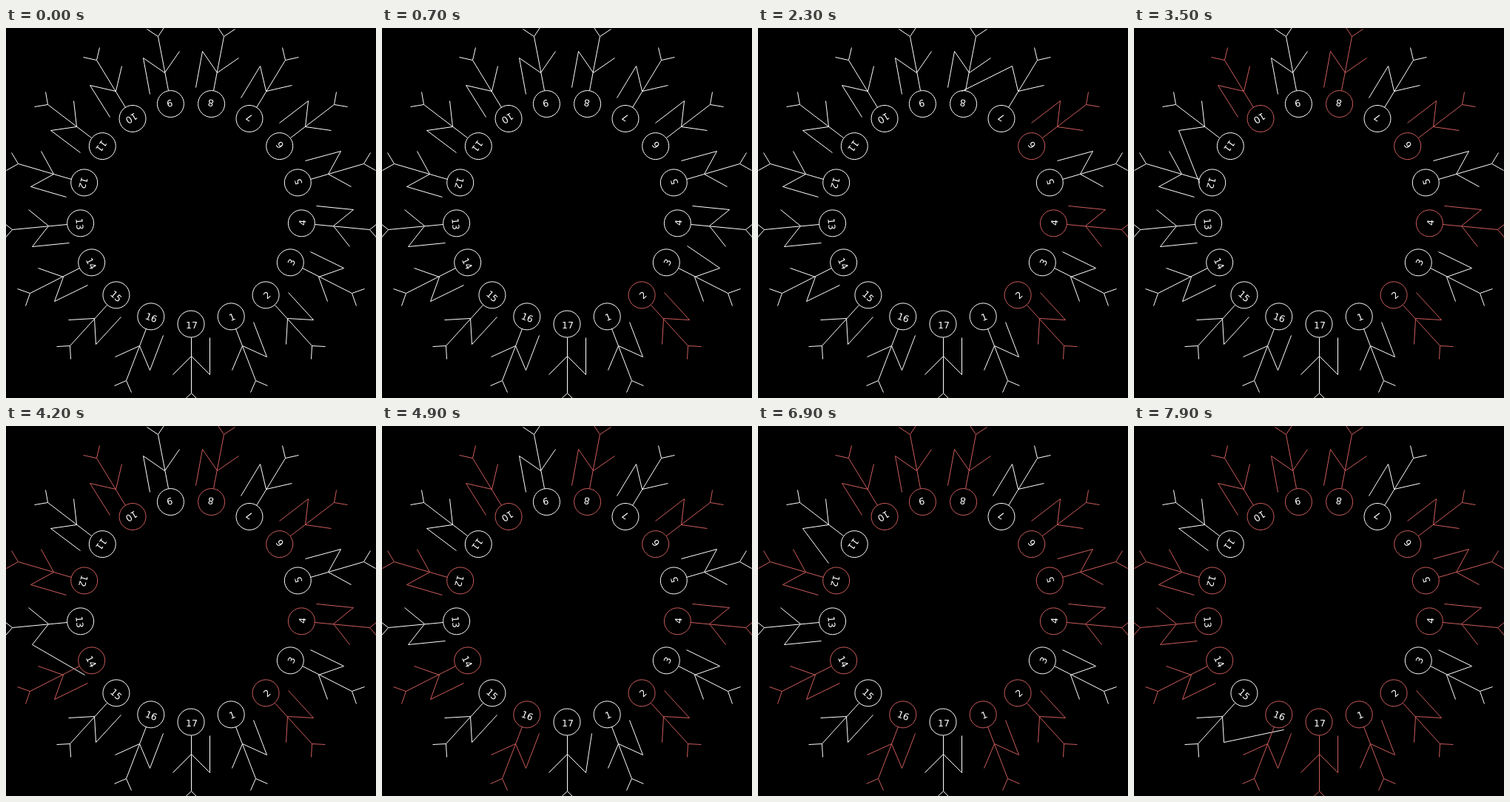
Animation, 500 px wide and 500 px high, one loop 8 s. Source, as an HTML page:

```html
<!DOCTYPE html>
<html lang="en">
<head>
<meta charset="utf-8">
<title>Josephus circle</title>
<style>
  html, body { margin: 0; width: 100%; height: 100%; overflow: hidden; background: #000; }
  svg { display: block; width: 100vw; height: 100vh; }
  path, circle { fill: none; stroke: #fff; stroke-width: 1; }
  .dead path, .dead circle { stroke: #cd5c5c; }
  text { fill: #fff; font: 12.5px "DejaVu Sans", Verdana, sans-serif; text-anchor: middle; }
</style>
</head>
<body>
<svg id="stage" viewBox="0 0 500 500"></svg>
<script>
const COUNT = 17, CENTER = 250, TICK = 100, TICKS = 80, SWING = 6;
const HIP = [0, 243], SHOULDER = [0, 193], HAND = [25, 218];
const REST = [25, 168], STEP = [8.05, -2.9];
const BODY = [
  [[0, 168], HIP], [HIP, [-12.5, 255.5]], [HIP, [12.5, 255.5]],
  [SHOULDER, [-25, 218]], [SHOULDER, HAND]
];
const stage = document.getElementById("stage");

function add(parent, tag, attrs) {
  const el = document.createElementNS("http://www.w3.org/2000/svg", tag);
  for (const key in attrs) el.setAttribute(key, attrs[key]);
  return parent.appendChild(el);
}

// Turns a point of the figure at the bottom of the ring into place.
function turn([x, y], angle) {
  const c = Math.cos(angle), s = Math.sin(angle);
  return [CENTER + x * c + y * s, CENTER - x * s + y * c];
}

// Line ends sit on whole pixels.
const snap = v => Math.floor(v + 1e-9) + 0.5;
const line = (from, to, angle) =>
  "M" + turn(from, angle).map(snap) + "L" + turn(to, angle).map(snap);

const people = Array.from({ length: COUNT }, (_, i) => {
  const angle = (i + 1) * 2 * Math.PI / COUNT;
  const group = add(stage, "g", {});
  const [cx, cy] = turn([0, 150], angle);
  add(group, "circle", { cx, cy, r: 18 });
  add(group, "path", { d: BODY.map(([a, b]) => line(a, b, angle)).join("") });
  const sword = add(group, "path", {});
  const spin = `translate(${cx} ${cy}) rotate(${-angle * 180 / Math.PI})`;
  add(group, "text", { x: 1, y: 5.7, transform: spin }).textContent = i + 1;
  return { group, sword, angle };
});

// Every second living person falls; the turn that crosses the end takes one tick more.
function planTurns() {
  const turns = [], alive = Array(COUNT).fill(true);
  const next = i => {
    do i = (i + 1) % COUNT; while (!alive[i]);
    return i;
  };
  for (let killer = 0, start = 0; start < TICKS;) {
    const victim = next(killer);
    const end = start + SWING + (victim < killer ? 1 : 0);
    turns.push({ killer, victim, start, end });
    alive[victim] = false;
    killer = next(victim);
    start = end;
  }
  return turns;
}
const turns = planTurns();

function draw(tick) {
  const swing = Array(COUNT).fill(0), dead = Array(COUNT).fill(false);
  for (const { killer, victim, start, end } of turns) {
    if (tick > start && tick <= end) swing[killer] = tick - start;
    if (tick >= end) dead[victim] = true;
  }
  people.forEach(({ group, sword, angle }, i) => {
    const tip = REST.map((v, axis) => v + STEP[axis] * swing[i]);
    sword.setAttribute("d", line(HAND, tip, angle));
    group.setAttribute("class", dead[i] ? "dead" : "");
  });
}

const begin = performance.now();
let shown = -1;
function loop() {
  const tick = Math.floor((performance.now() - begin) / TICK) % TICKS;
  if (tick !== shown) draw(shown = tick);
  requestAnimationFrame(loop);
}
loop();
</script>
</body>
</html>
```
